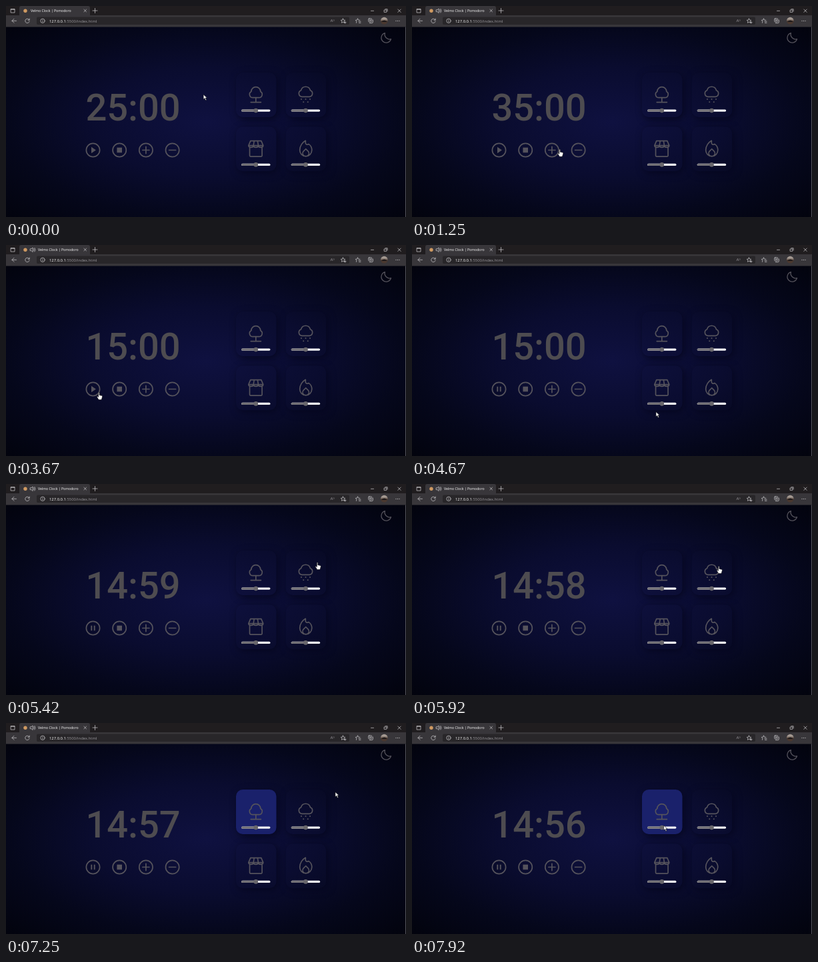
These frames come from a looping animation (600x317 px, 8000 ms). An HTML page:

```html
<!DOCTYPE html>
<html lang="en">
<head>
<meta charset="utf-8">
<title>Pomodoro</title>
<style>
  html, body { margin: 0; width: 100%; height: 100%; overflow: hidden; background: #02030f; }
  svg { display: block; width: 100%; height: 100%; }
  .ui { font-family: "Open Sans", "Noto Sans", sans-serif; }
  .line { fill: none; stroke: #d2d0d3; stroke-width: .7; stroke-linecap: round; }
  .icon { fill: none; stroke: #55535c; stroke-width: 16; stroke-linecap: round; stroke-linejoin: round; }
  .solid { fill: #55535c; stroke: none; }
  .card { fill: url(#night); filter: drop-shadow(3px 3px 6px #05061f); }
  .card.on { fill: #1a216b; }
  #clock { font: 500 56px Roboto, sans-serif; fill: #4e4c50; }
  #pointer path { fill: #fff; stroke: #111; stroke-width: 1.3; stroke-linejoin: round; }
</style>
</head>
<body>
<svg viewBox="0 0 600 317">
  <defs>
    <radialGradient id="night" gradientUnits="userSpaceOnUse" cx="0" cy="0" r="1"
      gradientTransform="translate(300 174)scale(425 205)">
      <stop offset="0" stop-color="#0f1140"/>
      <stop offset=".4" stop-color="#0a0c2f"/>
      <stop offset=".7" stop-color="#05071b"/>
      <stop offset="1" stop-color="#02030d"/>
    </radialGradient>
    <linearGradient id="photo" x2="0" y2="1">
      <stop offset=".25" stop-color="#a59a92"/>
      <stop offset=".6" stop-color="#4a382f"/>
    </linearGradient>
  </defs>

  <!-- Browser window -->
  <rect width="600" height="32" fill="#201d1f"/>
  <path d="M20 14V3q0-3 3-3h100q3 0 3 3v11z" fill="#38363a"/>
  <rect y="14" width="600" height="18" fill="#38363a"/>
  <rect x="46" y="16.5" width="469" height="11.5" rx="2" fill="#282629"/>
  <circle cx="29" cy="7.2" r="2.7" fill="#cf9a62"/>
  <g class="line">
    <path d="M7.5 4.5h5.5v5.5h-5.5zM7.5 5.3h5.5"/>
    <path d="M116.9 5.2l3.6 3.6m0-3.6l-3.6 3.6M130 7h7M133.5 3.5v7"/>
    <path d="M547.5 7.3h4M587.8 5l4.4 4.4m0-4.4l-4.4 4.4M567.5 6h3.3v3.3h-3.3zM568.8 4.7h3.3v3.3"/>
    <path d="M9 22.3h6.5M12 19.3l-3 3 3 3M34.8 20.8a3.2 3.2 0 1 0 .3 2.4M35.2 19v2.2h-2.2"/>
    <circle cx="55" cy="22.3" r="3.2"/>
    <path d="M55 22v1.9M55 20.7v.1"/>
    <path d="M505.500 19l1 2.100 2.300.3-1.700 1.600.4 2.300-2-1.100-2 1.100.4-2.300-1.700-1.600 2.300-.3zM507.500 24.800h2.600m-1.300-1.300v2.600"/>
    <path d="M527.5 19l1 2.100 2.300.3M529 23.300h3m-2.500 2h2.500M525.500 25.300l.4-2.300-1.700-1.600 2.300-.3 1-2.100"/>
    <rect x="543.7" y="18.8" width="5" height="5" rx="1"/>
    <path d="M545.4 25.6h3.4q1.6 0 1.6-1.6v-3M546.2 20.2v2.2m-1.1-1.1h2.2"/>
  </g>
  <circle cx="567.3" cy="22.2" r="5.4" fill="url(#photo)"/>
  <path d="M562.5 24q5-5 9.600 0z" fill="#1f1a1a"/>
  <g fill="#d2d0d3">
    <circle cx="585" cy="22.3" r=".6"/><circle cx="587.5" cy="22.3" r=".6"/><circle cx="590" cy="22.3" r=".6"/>
  </g>
  <g class="ui" fill="#fff">
    <text id="title" x="37" y="9.100" font-size="5.2">Velmo Clock | Pomodoro</text>
    <text x="65" y="24.500" font-size="5.900">127.0.0.1<tspan fill="#9a989c">:5500/index.html</tspan></text>
    <text x="486.500" y="24.200" font-size="6" fill="#9a989c">A<tspan font-size="3.800" dy="-1.5">))</tspan></text>
  </g>
  <path id="sound" class="line" d="M36.500 5.800h1.600l2-1.900v6.600l-2-1.900h-1.600zM41.700 5.600q1 1.600 0 3.200M43 4.400q2 2.800 0 5.600"/>

  <!-- Page -->
  <rect y="31.500" width="600" height="286" fill="url(#night)"/>
  <rect x="599" y="31.500" width="1" height="286" fill="#55555c"/>
  <path class="icon" transform="translate(560.100 37.500)scale(.08)"
    d="M216.700 152.600A92 92 0 0 1 103.400 39.300 92 92 0 1 0 216.700 152.600z"/>
  <text id="clock" x="119.400" y="171.800"></text>
  <g id="buttons"></g>
  <g id="cards"></g>
  <g id="pointer">
    <path id="arrow" transform="scale(.45)" d="M0 0V16l4-4 3 7 3-1-3-7h5z"/>
    <path id="hand" transform="scale(.5)translate(-5 -1)"
      d="M5 1.500a1.500 1.500 0 0 1 3 0V8l7 1.500q2 .5 2 3L15.500 18 14 22H6L1 14c-1-2 1-3 2-2l2 2z"/>
  </g>
</svg>
<script>
const $ = id => document.getElementById(id);
const SCALE = 27 / 256;
const icon = (x, y, body) =>
  `<g class="icon" transform="translate(${x} ${y})scale(${SCALE})">${body}</g>`;
const line = d => `<path d="${d}"/>`;
const solid = (d, id = '') => `<path class="solid" id="${id}" d="${d}"/>`;
const dot = (x, y) => `<circle class="solid" cx="${x}" cy="${y}" r="10"/>`;

const glyphs = [
  solid('M104 82L170 128 104 174z', 'play') + solid('M98 92h18v72h-18zM140 92h18v72h-18z', 'pause'),
  solid('M92 92h72v72h-72z'),
  line('M80 128h96M128 80v96'),
  line('M80 128h96')
];
$('buttons').innerHTML = glyphs.map((g, i) =>
  icon(117 + i * 39.7, 203, '<circle cx="128" cy="128" r="96"/>' + g)).join('');

const tree = line('M88 172a46 46 0 0 1-26-86a66 66 0 0 1 132 0a46 46 0 0 1-26 86zM128 172v66M56 238h144');
const rain = line('M72 160a48 48 0 0 1-10-92a68 68 0 0 1 132 0a48 48 0 0 1-10 92z')
  + dot(66, 194) + dot(128, 194) + dot(190, 194) + dot(97, 234) + dot(159, 234);
const scallop = 'a34.700 28 0 0 0 69.300 0';
const shop = line('M52 18H204L232 84H24zM93 84L104 18M163 84L152 18M24 84'
  + scallop.repeat(3) + 'M40 122V228q0 12 12 12H204q12 0 12-12V122');
const fire = line('M126 14C84 36 44 88 44 150a86 86 0 0 0 172 0c0-38-18-70-46-88-22 16-44 4-44-16z'
  + 'M130 132l-32 32a44 44 0 1 0 64 0z');

$('cards').innerHTML = [tree, rain, shop, fire].map((art, i) => {
  const x = 345 + i % 2 * 74.7, y = 100 + (i >> 1) * 81.3;
  return `<rect class="card" x="${x}" y="${y}" width="60.500" height="67" rx="10"/>`
    + icon(x + 16.300, y + 19.500, art)
    + `<rect x="${x + 8}" y="${y + 55.400}" width="43.500" height="3.400" rx="1.700" fill="#f4f4f5"/>`
    + `<rect x="${x + 8}" y="${y + 55.400}" width="22" height="3.400" rx="1.700" fill="#747277"/>`
    + `<circle cx="${x + 29.800}" cy="${y + 57.100}" r="3.300" fill="#69676c"/>`;
}).join('');
const treeCard = document.querySelector('.card');

// Pointer stops: time, x, y
const path = [
  [0, 296, 133], [200, 354, 150], [500, 220, 215], [1420, 221, 216],
  [1830, 247.500, 217], [3080, 247.500, 217], [3420, 190, 231], [3670, 138, 222],
  [4000, 138, 222], [4500, 320, 262], [4900, 430, 235], [5420, 466.500, 117.500],
  [5670, 494, 122], [6170, 424, 126], [6420, 396, 128], [6580, 394, 128],
  [6920, 394, 128], [7330, 518, 98], [7750, 384, 155], [7920, 377.500, 154]
];
// Each entry holds [start time, value]
const times = [
  [0, '25:00'], [1000, '30:00'], [1250, '35:00'], [2000, '30:00'], [2500, '25:00'],
  [3000, '20:00'], [3250, '15:00'], [4830, '14:59'], [5830, '14:58'], [6830, '14:57'], [7830, '14:56']
];
const current = (list, t) => list.filter(e => e[0] <= t).pop();

function pointerAt(t) {
  const i = path.findIndex(p => p[0] > t);
  if (i < 0) return path[path.length - 1].slice(1);
  const [t0, x0, y0] = path[i - 1], [t1, x1, y1] = path[i];
  const k = (t - t0) / (t1 - t0);
  return [x0 + (x1 - x0) * k, y0 + (y1 - y0) * k];
}

function isHand(x, y, t) {
  if (t < 660) return false;
  const onButton = [0, 1, 2, 3].some(i => Math.hypot(x - 130.500 - i * 39.700, y - 216.500) < 13);
  const inColumn = (x > 345 && x < 405) || (x > 420 && x < 480);
  const inRow = (y > 100 && y < 152) || (y > 181 && y < 233);
  return onButton || (inColumn && inRow);
}

const show = (id, on) => $(id).setAttribute('visibility', on ? 'visible' : 'hidden');

function draw(now) {
  const t = Math.floor((now % 8000 + 4) * .012) / .012 + .5;
  const [x, y] = pointerAt(t), hand = isHand(x, y, t);
  $('pointer').setAttribute('transform', `translate(${x} ${y})`);
  show('hand', hand);
  show('arrow', !hand);
  show('pause', t >= 3830);
  show('play', t < 3830);
  show('sound', t >= 1080);
  $('title').setAttribute('x', t >= 1080 ? 48 : 37);
  $('clock').textContent = current(times, t)[1];
  treeCard.classList.toggle('on', t >= 6415);
  requestAnimationFrame(draw);
}
requestAnimationFrame(draw);
</script>
</body>
</html>
```
